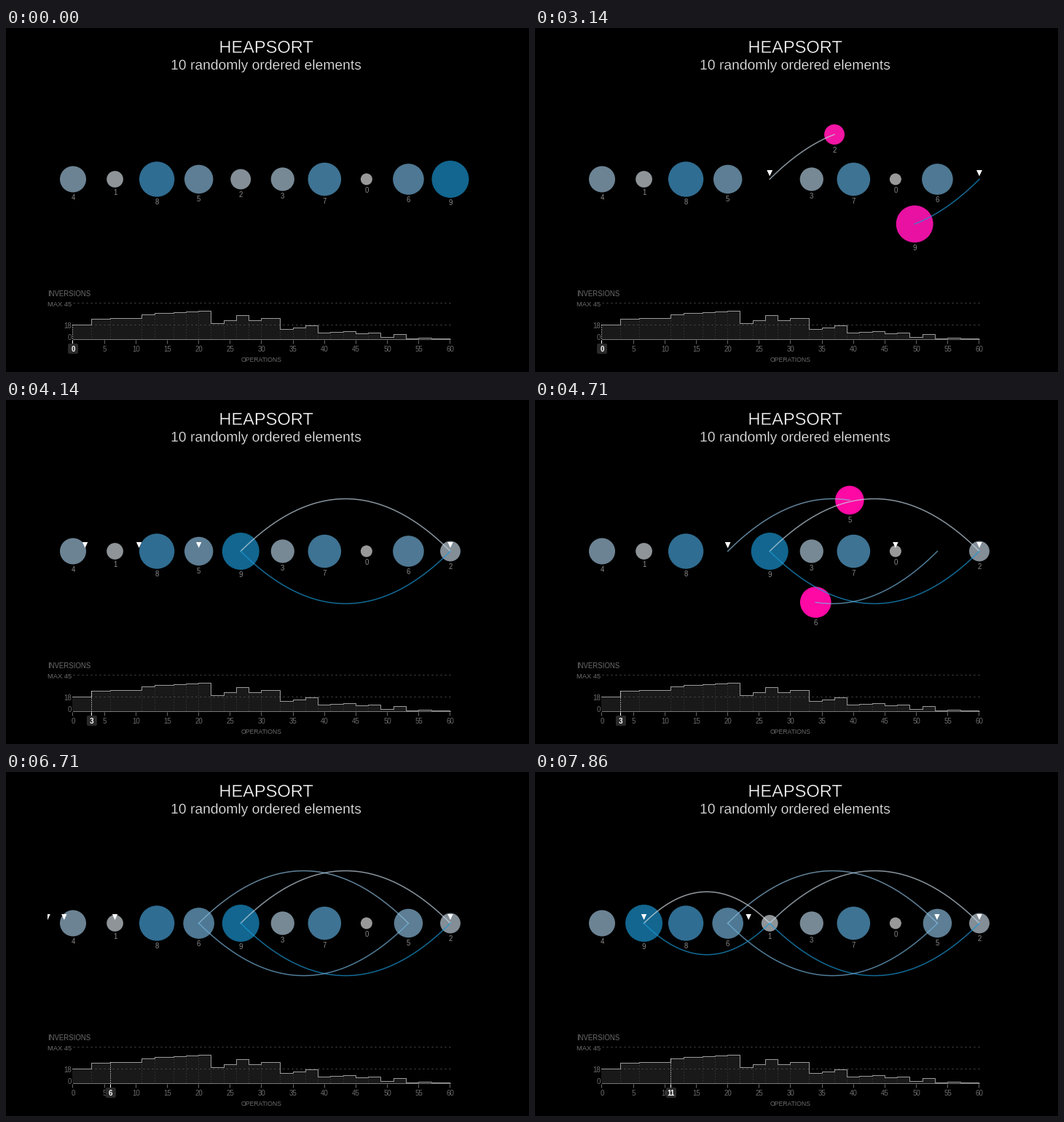
Animation of 718x472 px, one loop 8000 ms. Source, as a matplotlib script:

```python
import matplotlib.pyplot as plt
import numpy as np
from matplotlib.animation import FuncAnimation
from matplotlib.patches import Circle, FancyBboxPatch
from matplotlib.patheffects import Stroke

W, H = 718, 472
PX = 0.72                      # one pixel in points at 100 dpi
LOOP, TICK, FPS = 8000, 40, 7
LEFT, RIGHT, MID = 92, 610, 207.5
BASE, UNIT = 427, 50 / 45      # chart baseline, pixels per inversion
HOT = np.array([255, 8, 164]) / 255

START = [4, 1, 8, 5, 2, 3, 7, 0, 6, 9]
N = len(START)
SWAP_OPS = [3, 6, 11, 13, 16, 18, 20, 22, 24, 26, 28, 30, 33, 35, 37, 39, 41,
            43, 45, 47, 49, 51, 53, 55, 57, 60]

# (start ms, left slot, right slot, operation reached)
SWAPS = [(2930, 4, 9, 3), (4450, 3, 8, 6), (7031, 1, 4, 11)]
SWAP_MS, FADE_MS, MOVE_MS = 500, 300, 500

# Moves of the four index markers: (start ms, duration, slot); -1 is off stage
SIFT = [(2404, MOVE_MS), (3430, FADE_MS), (3927, MOVE_MS), (4970, FADE_MS),
        (5511, MOVE_MS), (6021, FADE_MS), (6531, MOVE_MS), (7531, MOVE_MS)]
MARKERS = [
    [(1900, MOVE_MS, 4), (3430, MOVE_MS, 3), (4970, MOVE_MS, 2), (6021, MOVE_MS, 1)],
    [(1900, MOVE_MS, 9)],
    [(*s, to) for s, to in zip(SIFT, [4, -1, 3, -1, 2, -1, 1, 4])],
    [(*s, to) for s, to in zip(SIFT, [9, -1, 7, -1, 5, -1, 3, 9])],
]


def ease(u):
    u = min(max(u, 0), 1)
    return 4 * u**3 if u < 0.5 else 1 - 4 * (1 - u)**3


def slot_x(i):
    return LEFT + (RIGHT - LEFT) * i / (N - 1)


def op_x(op):
    return LEFT + (RIGHT - LEFT) * op / 60


def rule_x(op):
    """Position of a one-pixel vertical rule, just left of the label centre."""
    return op_x(op) - 0.6


def radius(v):
    return np.sqrt(64 + 65 * v)


def tint(v):
    rgb = [(153, 108, 47, 18), (153, 131, 109, 102), (153, 148, 146, 143)]
    return np.array([np.interp(v, (0, 4, 8, 9), c) for c in rgb]) / 255


def inversions(a):
    return sum(a[i] > a[j] for i in range(len(a)) for j in range(i + 1, len(a)))


def heapsort_history(a):
    """Inversion count before the sort and after each swap."""
    a = list(a)
    counts = [inversions(a)]

    def swap(i, j):
        a[i], a[j] = a[j], a[i]
        counts.append(inversions(a))

    def sift(root, end):
        while 2 * root + 1 <= end:
            kids = range(2 * root + 1, min(2 * root + 2, end) + 1)
            best = max([root, *kids], key=lambda k: a[k])
            if best == root:
                return
            swap(root, best)
            root = best

    for root in range(N // 2 - 1, -1, -1):
        sift(root, N - 1)
    for end in range(N - 1, 0, -1):
        swap(0, end)
        sift(0, end - 1)
    return counts


fig = plt.figure(figsize=(W / 100, H / 100), dpi=100, facecolor="black")
ax = fig.add_axes([0, 0, 1, 1])
ax.set(xlim=(0, W), ylim=(H, 0))
ax.axis("off")


def text(x, y, s, size, color, ha="center", **kw):
    return ax.text(x, y, s, fontsize=size * PX, color=color, ha=ha,
                   va="baseline", family="Liberation Sans", **kw)


def line(x, y, color, width=1, **kw):
    return ax.plot(x, y, color=color, lw=width * PX, **kw)[0]


def thin(width):
    return [Stroke(linewidth=width * PX, foreground="black")]


# Headings
text(357, 34, "HEAPSORT", 23.6, "white", path_effects=thin(0.4))
text(356.6, 57, "10 randomly ordered elements", 19.3, "#f0f0f0", path_effects=thin(0.3))

# Inversions chart
counts = heapsort_history(START)
ops = [0] + SWAP_OPS
heights = BASE - UNIT * np.array(counts)
xs = rule_x(np.array(ops))
GREY = "#6c6c6c"

ax.fill_between(xs, heights, BASE, step="post", color="#191919", lw=0)
ax.vlines(xs[1:-1], heights[1:-1], BASE, color="#484848", lw=PX,
          linestyles=(0, (1, 3)))
for level in (45, 18):
    y = BASE - UNIT * level
    line([LEFT, RIGHT], [y, y], "#4c4c4c", dashes=(2, 4), dash_capstyle="butt")
line([LEFT, RIGHT], [BASE, BASE], "#777777")
line(xs, heights, "#9a9a9a", drawstyle="steps-post", solid_joinstyle="miter")
for op in range(0, 61, 5):
    line([rule_x(op)] * 2, [428, 433], "#666666", solid_capstyle="butt")
    text(op_x(op), 444, str(op), 9.8, GREY)
text(57, 368, "INVERSIONS", 9.6, GREY, "left")
text(90, 382, "MAX 45", 9.4, GREY, "right")
text(90, 412, "18", 9.8, GREY, "right")
text(90, 428, "0", 9.8, GREY, "right")
text(351, 458, "OPERATIONS", 8.6, GREY)

# Cursor on the operations axis
cursor_dots = line([], [], "white", dashes=(1, 2), dash_capstyle="butt", zorder=4)
cursor_tick = line([], [], "white", solid_capstyle="butt", zorder=4)
cursor_box = FancyBboxPatch((0, 433), 14, 14, fc="#2a2a2a", lw=0, zorder=5,
                            boxstyle="round,pad=0,rounding_size=2")
ax.add_patch(cursor_box)
cursor_text = text(0, 444, "0", 9.8, "white", weight="bold", zorder=6)

# Balls, trails and markers
balls = [ax.add_patch(Circle((0, 0), radius(v), lw=0, zorder=3)) for v in range(N)]
labels = [text(0, 0, str(v), 9.6, "#8a8a8a", zorder=3) for v in range(N)]
trails = [[line([], [], "white", 1.5, zorder=4, alpha=0.7) for _ in range(2)]
          for _ in SWAPS]
arrows = [ax.fill([0], [0], color="white", lw=0, zorder=6)[0] for _ in MARKERS]
for arrow in arrows:
    arrow.set_clip_path(plt.Rectangle((57, 0), W, H, transform=ax.transData))


def hop(x0, x1, side, u):
    """Point on the swap arc from x0 to x1."""
    return x0 + (x1 - x0) * u, MID + side * abs(x1 - x0) * u * (1 - u)


def place(v, x, y, heat):
    balls[v].center = x, y
    balls[v].set_facecolor(tint(v) * (1 - heat) + HOT * heat)
    labels[v].set_position((x, y + radius(v) + 10.5))


def draw_balls(t):
    slots, op = list(START), 0
    spots = {v: (slot_x(i), MID) for i, v in enumerate(slots)}
    heats = dict.fromkeys(slots, 0)
    for (t0, i, j, reached), pair in zip(SWAPS, trails):
        u = ease((t - t0) / SWAP_MS)
        heat = ease((t - t0) / FADE_MS) - ease((t - t0 - SWAP_MS) / FADE_MS)
        for trail, a, b, side in zip(pair, (i, j), (j, i), (-1, 1)):
            v = slots[a]
            trail.set_data(*hop(slot_x(a), slot_x(b), side, np.linspace(0, u, 50)))
            trail.set_color(tint(v) * 1.5)   # translucent, so brighter on balls
            trail.set_visible(u > 0)
            if u > 0:
                spots[v] = hop(slot_x(a), slot_x(b), side, u)
                heats[v] = heat
        if t >= t0 + SWAP_MS:
            slots[i], slots[j] = slots[j], slots[i]
            op = reached
    for v in slots:
        place(v, *spots[v], heats[v])
    return op


def draw_markers(t):
    for arrow, moves in zip(arrows, MARKERS):
        slot = -1
        for t0, ms, to in moves:
            slot += (to - slot) * ease((t - t0) / ms)
        x = slot_x(slot)
        arrow.set_xy([(x - 3.7, 195), (x + 3.7, 195), (x, 203)])


def draw_cursor(op):
    x = rule_x(op)
    cursor_dots.set_data([x, x], [heights[ops.index(op)], 428])
    cursor_tick.set_data([x, x], [428, 433])
    cursor_box.set_x(op_x(op) - 7)
    cursor_text.set_x(op_x(op))
    cursor_text.set_text(str(op))


def update(k):
    # motion is stepped at FPS, finer ticks only keep the loop length exact
    step = (k * TICK + TICK - 1) * FPS // 1000
    t = step * 1000 / FPS
    draw_cursor(draw_balls(t))
    draw_markers(t)
    return []


anim = FuncAnimation(fig, update, frames=LOOP // TICK, interval=TICK,
                     init_func=lambda: update(0), repeat=True, repeat_delay=0)
plt.show()
```
